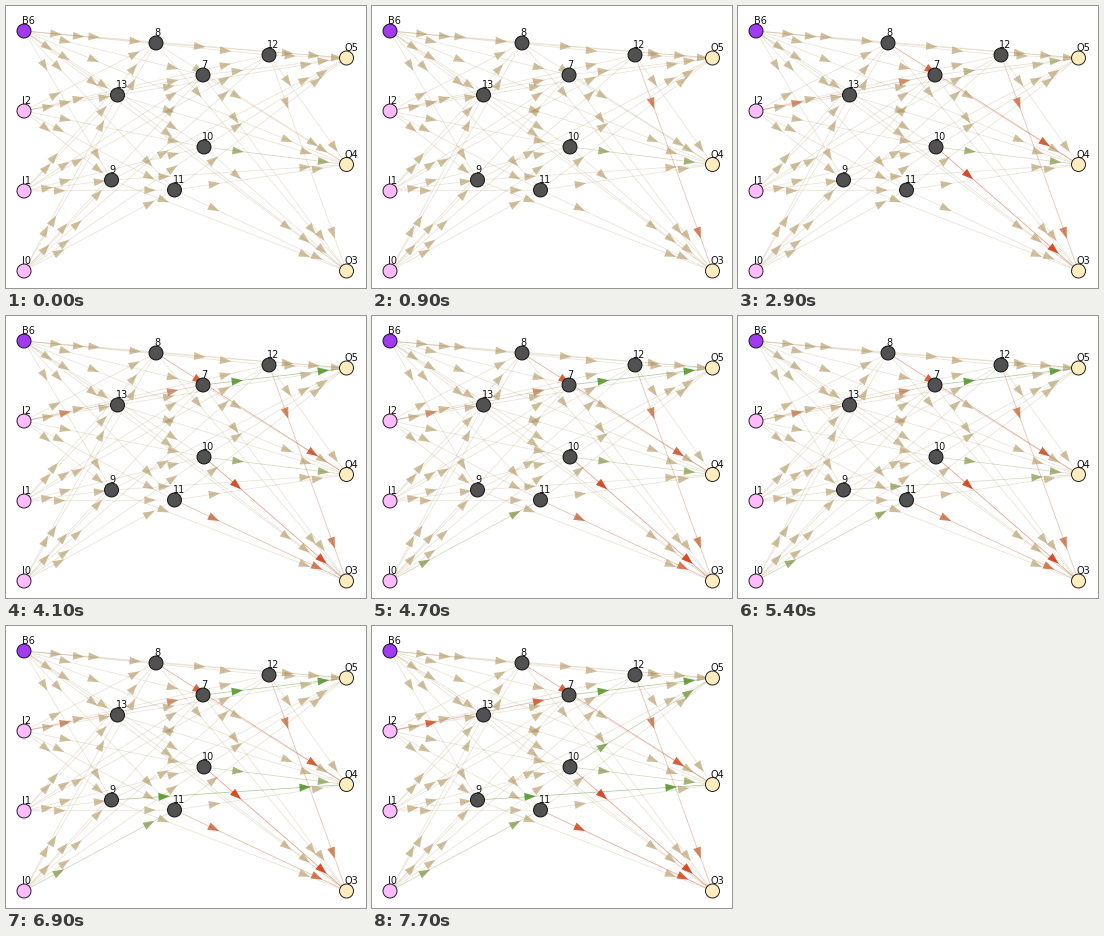
Recreate the animation shown at these times as a matplotlib script. Size 360 by 282 pixels, loop 8 s.

```python
import numpy as np
import matplotlib.pyplot as plt
from matplotlib.animation import FuncAnimation
from matplotlib.collections import LineCollection, PolyCollection
from matplotlib.patches import Circle

W, H, DPI = 360, 282, 100
STEP, FRAMES = 100, 80
PX = 72 / DPI
FADE = 500  # ms a weight takes to settle after an update

INPUTS = ["B6", "I2", "I1", "I0"]
OUTPUTS = ["O5", "O4", "O3"]
HIDDEN = {"7": (197, 69), "8": (150, 37), "9": (105.5, 174), "10": (198, 141),
          "11": (168.5, 184), "12": (263, 49), "13": (111.5, 89)}
NODES = dict(HIDDEN)
NODES.update({n: (18, 25 + 80 * i) for i, n in enumerate(INPUTS)})
NODES.update({n: (340.5, 52 + 106.5 * i) for i, n in enumerate(OUTPUTS)})
FILL = {"B": "#a23af2", "I": "#ffbbff", "O": "#ffecbf"}

TAN = np.array([176, 149, 94]) / 255
RED = np.array([214, 44, 4]) / 255
GREEN = np.array([44, 142, 14]) / 255

# Weight updates: edge, onset in ms, change
UPDATES = [
    ("10-O4", -FADE, .33),
    ("12-O3", 400, -.5),
    ("I2-7", 800, -.4),
    ("10-O3", 1100, -.5),
    ("10-O3", 2400, -.4),
    ("8-O4", 2400, -.75),
    ("7-O5", 2800, .75),
    ("11-O3", 3400, -.55),
    ("I0-11", 4200, .4),
    ("9-O4", 5200, .78),
    ("11-O3", 6800, -.25),
    ("I2-7", 6900, -.3),
    ("10-O5", 7200, .5),
]

# The bias node also feeds the outputs directly
PAIRS = [(a, b) for a in INPUTS for b in HIDDEN]
PAIRS += [(a, b) for a in ["B6", *HIDDEN] for b in OUTPUTS]
active = {edge for edge, _, _ in UPDATES}
PAIRS.sort(key=lambda p: "-".join(p) in active)


def weight(edge, t):
    return sum(change * np.clip((t - onset) / FADE, 0, 1)
               for name, onset, change in UPDATES if name == edge)


def tint(w, low, high):
    s = abs(w)
    rgb = TAN + ((GREEN if w > 0 else RED) - TAN) * s
    return (*rgb, low + (high - low) * s)


def head(a, b, at, length=11.5, half=4):
    d = b - a
    u = d / np.hypot(*d)
    n = np.array([-u[1], u[0]]) * half
    base = a + at * d
    return [base + n, base + u * length, base - n]


fig = plt.figure(figsize=(W / DPI, H / DPI), dpi=DPI, facecolor="white")
ax = fig.add_axes([0, 0, 1, 1])
ax.set(xlim=(0, W), ylim=(H, 0))
ax.axis("off")

ends = [np.array([NODES[a], NODES[b]], float) for a, b in PAIRS]
lines = LineCollection(ends, linewidths=.8 * PX, zorder=1)
heads = PolyCollection([head(a, b, at) for a, b in ends for at in (.2, .8)],
                       linewidths=0, zorder=2)
ax.add_collection(lines)
ax.add_collection(heads)

for name, (x, y) in NODES.items():
    ax.add_patch(Circle((x, y), 7, fc=FILL.get(name[0], "#515151"),
                        ec=(0, 0, 0, .85), lw=PX, zorder=3))
    ax.text(x - 2, y - 7, name, fontsize=7, family="DejaVu Sans",
            color="#111111", zorder=4)


def draw(i):
    ws = [weight("-".join(p), i * STEP) for p in PAIRS]
    lines.set_color([tint(w, .25, .5) for w in ws])
    heads.set_facecolor([tint(w, .6, .9) for w in ws for _ in range(2)])
    return lines, heads


anim = FuncAnimation(fig, draw, frames=FRAMES, interval=STEP,
                     init_func=lambda: draw(0), repeat=True, repeat_delay=0)

plt.show()
```
